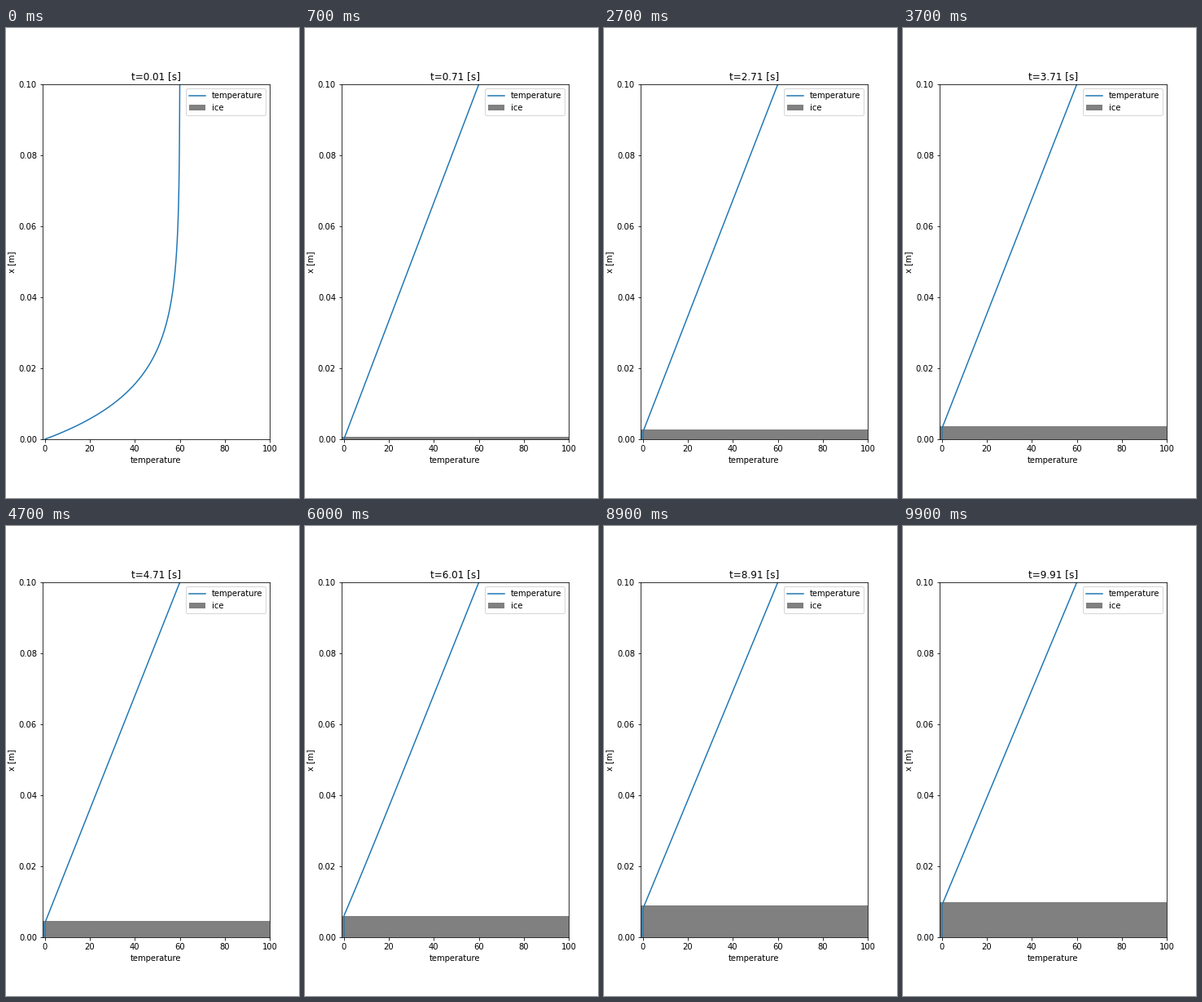
A matplotlib script for the animation above (10 s loop, 360 px wide and 576 px high).

```python
import numpy as np
import matplotlib.pyplot as plt
from matplotlib.animation import FuncAnimation

FRAMES, INTERVAL = 100, 100
DT, DX, DEPTH = 0.01, 0.001, 0.1
DIFFUSIVITY = 0.02
STEPS_PER_FRAME = 10
GROWTH = 0.001  # ice growth, m/s
T_TOP = 60.0

x = np.linspace(0, DEPTH, int(round(DEPTH / DX)) + 1)


def step_matrix(frozen):
    """Inverse of one implicit diffusion step; frozen nodes and the top are fixed."""
    r = DIFFUSIVITY * DT / DX**2
    a = np.eye(x.size)
    for i in range(frozen + 1, x.size - 1):
        a[i, i - 1:i + 2] = -r, 1 + 2 * r, -r
    return np.linalg.inv(a)


def solve():
    """Temperature profile for every frame."""
    temp = np.full(x.size, T_TOP)
    profiles = []
    last = -1
    for k in range((FRAMES - 1) * STEPS_PER_FRAME + 1):
        frozen = int(k * DT * GROWTH / DX + 1e-9)
        if frozen != last:
            step, last = step_matrix(frozen), frozen
        temp[:frozen + 1] = 0
        temp = step @ temp
        if k % STEPS_PER_FRAME == 0:
            profiles.append(temp.copy())
    return profiles


profiles = solve()

plt.rcParams["font.family"] = "DejaVu Sans"
fig, ax = plt.subplots(figsize=(5, 8), dpi=72)
fig.subplots_adjust(left=0.125, right=0.9, bottom=0.125, top=0.88)
line, = ax.plot([], [], color="tab:blue", label="temperature")
ice = ax.bar(49.5, 0, width=101, color="gray", label="ice")
ax.set(xlim=(-1, 100), ylim=(0, DEPTH), xlabel="temperature", ylabel="x [m]")
title = ax.set_title("")
ax.legend(loc="upper right")


def update(n):
    t = (n * STEPS_PER_FRAME + 1) * DT
    line.set_data(profiles[n], x)
    ice[0].set_height(GROWTH * t)
    title.set_text(f"t={t:.2f} [s]")
    return line, ice[0], title


anim = FuncAnimation(fig, update, frames=FRAMES, interval=INTERVAL,
                     repeat=True, repeat_delay=0)
plt.show()
```
